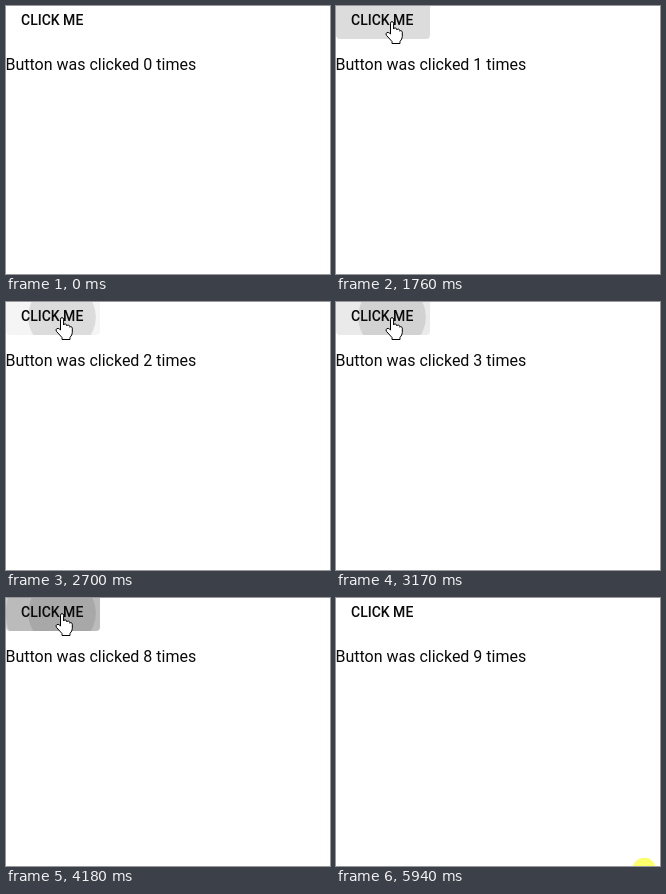
Recreate the animation shown at these times as an HTML page. Size 324 by 268 pixels, loop 6010 ms.

```html
<!DOCTYPE html>
<html lang="en">
<head>
<meta charset="utf-8">
<title>Click counter</title>
<style>
  html, body { margin: 0; width: 100%; height: 100%; overflow: hidden; background: #fff; }
  svg { display: block; }
  text { font: 400 16px Roboto, sans-serif; fill: #0a0a0a; }
  .label { font-weight: 500; font-size: 14px; }
  .cursor { fill: #fff; stroke: #000; stroke-linejoin: round; }
</style>
</head>
<body>
<svg width="324" height="268" viewBox="0 0 324 268">
  <clipPath id="shape"><rect y="-3" width="94" height="36" rx="4"/></clipPath>
  <g clip-path="url(#shape)">
    <rect id="hover" y="-3" width="94" height="36" opacity=".04"/>
    <g id="ripples"></g>
  </g>
  <text class="label" x="15" y="19">CLICK ME</text>
  <text id="info" x="-.6" y="64"></text>
  <circle id="press" r="11.7" fill="#ff0" opacity=".58"/>
  <path id="arrow" class="cursor" d="M.5 .5V16.5L4.2 13 6.8 18.8 9.3 17.7 6.8 12H11.8Z"/>
  <path id="hand" class="cursor" d="M-1.5 13V2.2Q-1.5 .6 0 .6T1.6 2.2V8Q2 6.8 3.2 6.9T4.7 8.4V9Q5.2 7.9 6.4 8.1T7.8 9.6V10.2Q8.3 9.4 9.2 9.7T10.3 11.2V15.5Q10.3 18 8 20.5V22.5H0V20.5L-5.6 14.3Q-6.6 12.6 -5.2 11.7T-2.6 12.1Z"/>
</svg>
<script>
// Everything is refreshed on a coarse beat; all times below are in beats.
const LOOP = 6010, START = 300, BEAT = 77.2;
const SPOT = [56, 15], EXIT = [302, 265];
const ENTER_BEATS = 6, LEAVE = 60, LEAVE_BEATS = 9, STOP = 73;
const presses = [12, 22, 30, 36, 39, 44, 45, 47, 49];

const $ = id => document.getElementById(id);
const clamp = x => Math.min(1, Math.max(0, x));
const mix = (a, b, p) => a.map((v, i) => v + (b[i] - v) * p);
const show = (el, on) => el.setAttribute('visibility', on ? 'visible' : 'hidden');
const place = (el, [x, y]) => el.setAttribute('transform', `translate(${x} ${y})`);

const ripples = presses.map(() => {
  const c = document.createElementNS('http://www.w3.org/2000/svg', 'circle');
  place(c, SPOT);
  return $('ripples').appendChild(c);
});

function cursorAt(k) {
  if (k < 0 || k > LEAVE + LEAVE_BEATS) return null;
  if (k < LEAVE) return mix([250, 194], SPOT, 1 - (1 - clamp(k / ENTER_BEATS)) ** 2);
  const p = (k - LEAVE) / LEAVE_BEATS;
  return mix([61, 24], EXIT, p * p * (3 - 2 * p));
}

function drawRipples(k) {
  // a full ripple stays until the next press
  const next = presses.findIndex(p => p > k);
  const clock = next > 0 ? Math.min(k, presses[next - 1] + 4) : k;
  ripples.forEach((c, i) => {
    const age = clock - presses[i];
    c.setAttribute('r', age > 0 ? 62 * (1 - Math.exp(-0.79 * age)) : 0);
    c.setAttribute('opacity', 0.1 * clamp((9 - age) / 4.5));
  });
}

function draw(time) {
  const k = Math.floor((time - START) / BEAT);
  const pos = cursorAt(k);
  const over = !!pos && pos[0] < 94 && pos[1] < 33;

  show($('hover'), over);
  show($('hand'), over);
  show($('arrow'), pos && !over);
  if (pos) place($(over ? 'hand' : 'arrow'), pos);
  drawRipples(k);

  show($('press'), k >= STOP || presses.includes(k));
  place($('press'), k >= STOP ? [308, 271.5] : [56, 14.5]);

  // the first response is slower than the rest
  const n = presses.filter((p, i) => k >= p + (i ? 3 : 6)).length;
  $('info').textContent = `Button was clicked ${n} times`;
}

const start = performance.now();
function tick() {
  draw((performance.now() - start) % LOOP);
  requestAnimationFrame(tick);
}
tick();
</script>
</body>
</html>
```
